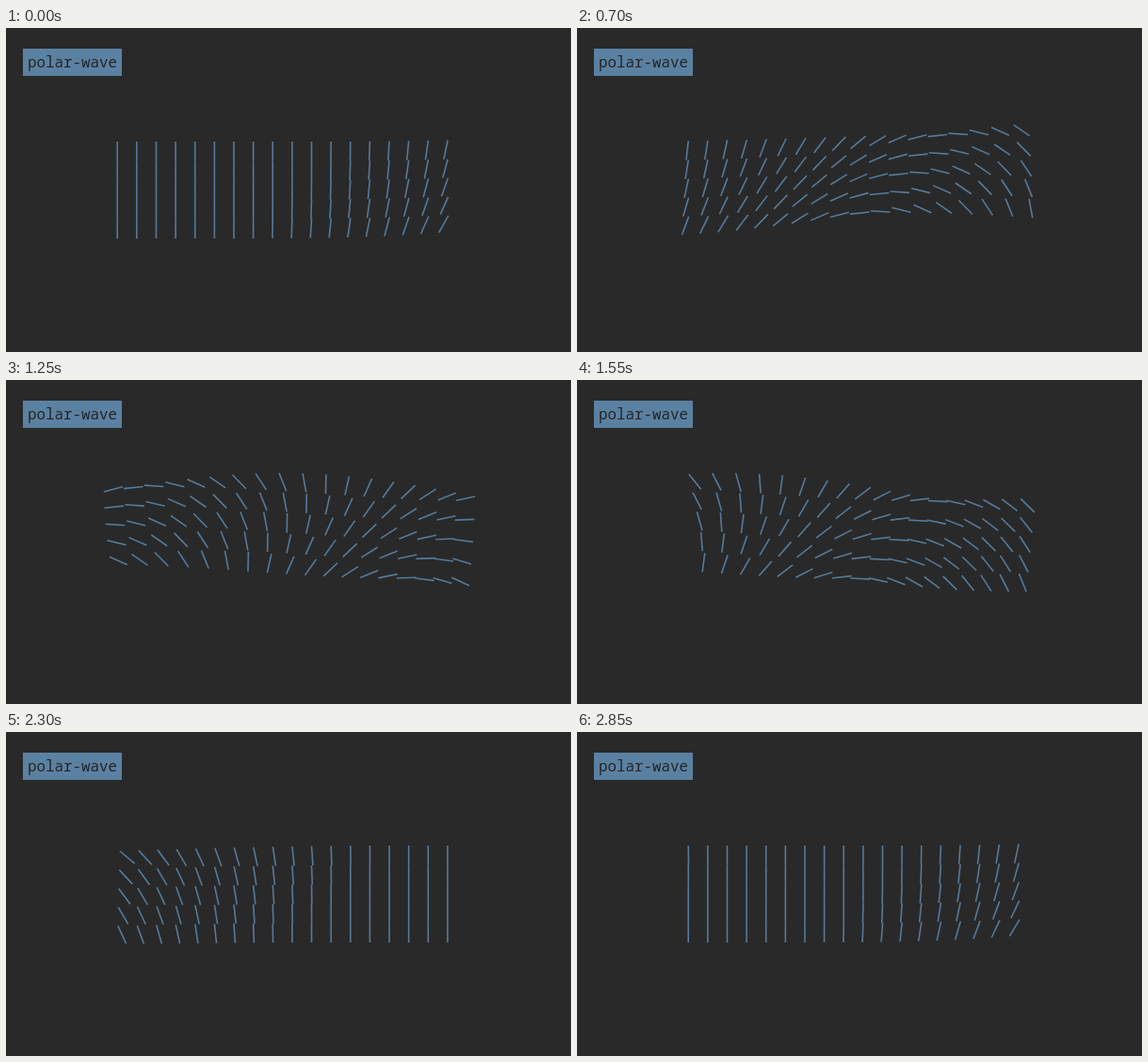
An HTML page with a canvas for the animation above (2900 ms loop, 600 px wide and 345 px high).

```html
<!DOCTYPE html>
<html lang="en">
<head>
<meta charset="utf-8">
<title>polar-wave</title>
<style>
  html, body { margin: 0; width: 100%; height: 100%; overflow: hidden; background: #292929; }
  canvas { display: block; width: 600px; height: 345px; }
  .label {
    position: absolute; left: 18px; top: 22px; width: 105px; height: 29px;
    background: #5b81a2; color: #242424; text-align: center;
    font: 15.8px/29px "Noto Sans Mono", "DejaVu Sans Mono", monospace;
  }
</style>
</head>
<body>
<canvas id="stage" width="600" height="345"></canvas>
<div class="label">polar-wave</div>
<script>
const ctx = document.getElementById('stage').getContext('2d');
const COLS = 18, ROWS = 5, CELL = 20.63;
const LEFT = 118.2, TOP = 121, ARM = 7.5;
const LOOP = 2900, TICK = 50;
const STEP = 45.8;   // ms of delay between neighbouring diagonals
const TURN = 54;     // length of one full turn, in steps
const CYCLE = 62;    // steps between the starts of two turns
const LEAD = 10.8;   // steps the first diagonal has already moved

// cubic-bezier(.42, 0, .58, 1)
function easeInOut(x) {
  if (x <= 0) return 0;
  if (x >= 1) return 1;
  let lo = 0, hi = 1;
  for (let i = 0; i < 24; i++) {
    const s = (lo + hi) / 2, q = 1 - s;
    if (1.26 * q * q * s + 1.74 * q * s * s + s * s * s < x) lo = s;
    else hi = s;
  }
  return lo * lo * (3 - 2 * lo);
}

function drawStick(col, row, angle) {
  ctx.save();
  ctx.translate(LEFT + ARM + col * CELL, TOP + row * CELL);
  ctx.rotate(angle);
  ctx.beginPath();
  ctx.moveTo(-ARM, 0);
  ctx.lineTo(-ARM, CELL);
  ctx.stroke();
  ctx.restore();
}

function draw(now) {
  const t = Math.floor(now % LOOP / TICK) * TICK;
  ctx.clearRect(0, 0, 600, 345);
  ctx.strokeStyle = '#567a9a';
  ctx.lineWidth = 1.6;
  for (let col = 0; col < COLS; col++) {
    for (let row = 0; row < ROWS; row++) {
      const delay = COLS - 1 - col + ROWS - 1 - row;
      let phase = t / STEP + LEAD - delay;
      if (phase >= CYCLE) phase -= CYCLE;
      drawStick(col, row, 2 * Math.PI * easeInOut(phase / TURN));
    }
  }
}

const start = performance.now();
function loop() {
  draw(performance.now() - start);
  requestAnimationFrame(loop);
}
loop();
</script>
</body>
</html>
```
